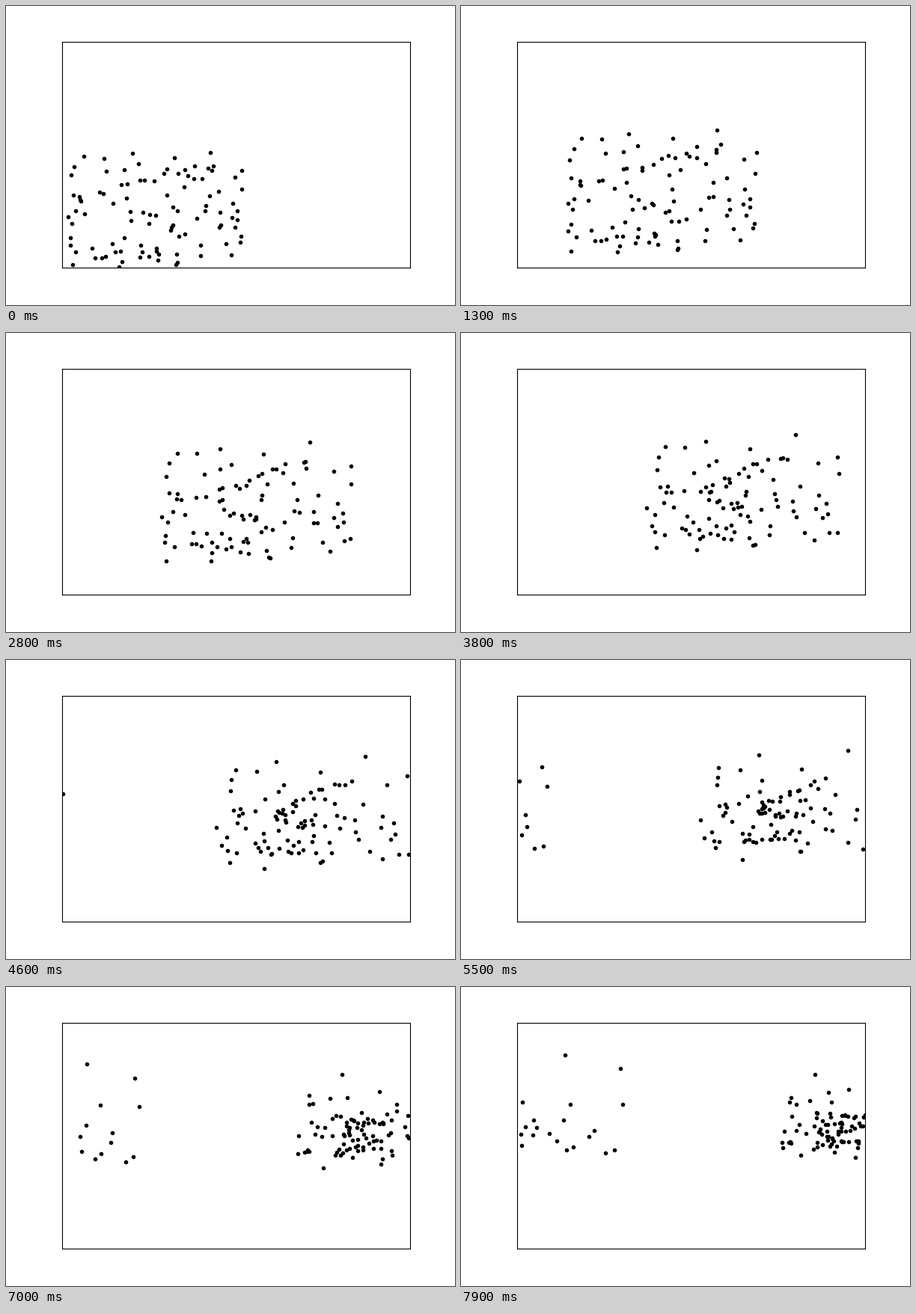
Write a matplotlib script that moves like this. It is 600 by 400 pixels and loops after 8 s.

```python
import numpy as np
import matplotlib.pyplot as plt
from matplotlib.animation import FuncAnimation

FRAMES, INTERVAL = 80, 100
LOW, HIGH = np.array([75, 48]), np.array([540, 350])
HOME, HALF = np.array([199, 272]), np.array([117, 77])
N = 100

# A few dots on the rim outline the flock; the rest start at random inside it
RIM = [(83, 282), (315, 245), (315, 220), (314, 308),
       (273, 196), (104, 201), (89, 346), (151, 349)]

rng = np.random.default_rng(7)
inside = rng.uniform(HOME - 0.98 * HALF, HOME + 0.98 * HALF, (N - len(RIM), 2))
offset = np.vstack([RIM, inside]) - HOME
lead, drop = (offset / HALF).T
edge = np.abs(offset / HALF).max(axis=1)

# Inner dots gather quickly, rim dots hardly; leaders on the right run ahead
pull_x = rng.uniform(1.0, 2.6, N) * (1 - np.minimum(edge, 1) ** 2) - 0.22 * lead
pull_y = pull_x + 0.5 * np.maximum(drop, 0)
pull = np.column_stack([pull_x, pull_y])

# Early burst before the dots line up with each other
kick = np.column_stack([22 * np.maximum(lead, 0), 12 * np.minimum(drop, 0)])
kick += rng.normal(0, 5, (N, 2)) * (1 - 0.8 * edge[:, None])

sway = rng.uniform(10, 34, (N, 2)) * (1 - 0.7 * edge[:, None])
rate = rng.uniform(0.4, 0.9, (N, 2))
phase = rng.uniform(0, 2 * np.pi, (N, 2))


def centre(t):
    return HOME + (45 * t - 0.85 * t**2, -14 * t + 0.5 * t**2)


def positions(t):
    spread = offset * np.exp(-pull * (t / 6.5) ** 2)
    burst = kick * (1 - np.exp(-t / 0.5))
    wander = sway * (t / 8) * np.sin(rate * t + phase)
    pos = centre(t) + spread + burst + wander
    return LOW + (pos - LOW) % (HIGH - LOW)


fig, ax = plt.subplots(figsize=(6, 4), dpi=100)
fig.subplots_adjust(left=0.125, right=0.9, bottom=0.125, top=0.88)
ax.set(xlim=(LOW[0], HIGH[0]), ylim=(HIGH[1], LOW[1]), xticks=[], yticks=[])
dots, = ax.plot(*positions(0).T, "k.", markersize=6)


def update(i):
    dots.set_data(*positions(i * INTERVAL / 1000).T)
    return dots,


anim = FuncAnimation(fig, update, frames=FRAMES, interval=INTERVAL,
                     repeat=True, repeat_delay=0)
plt.show()
```
